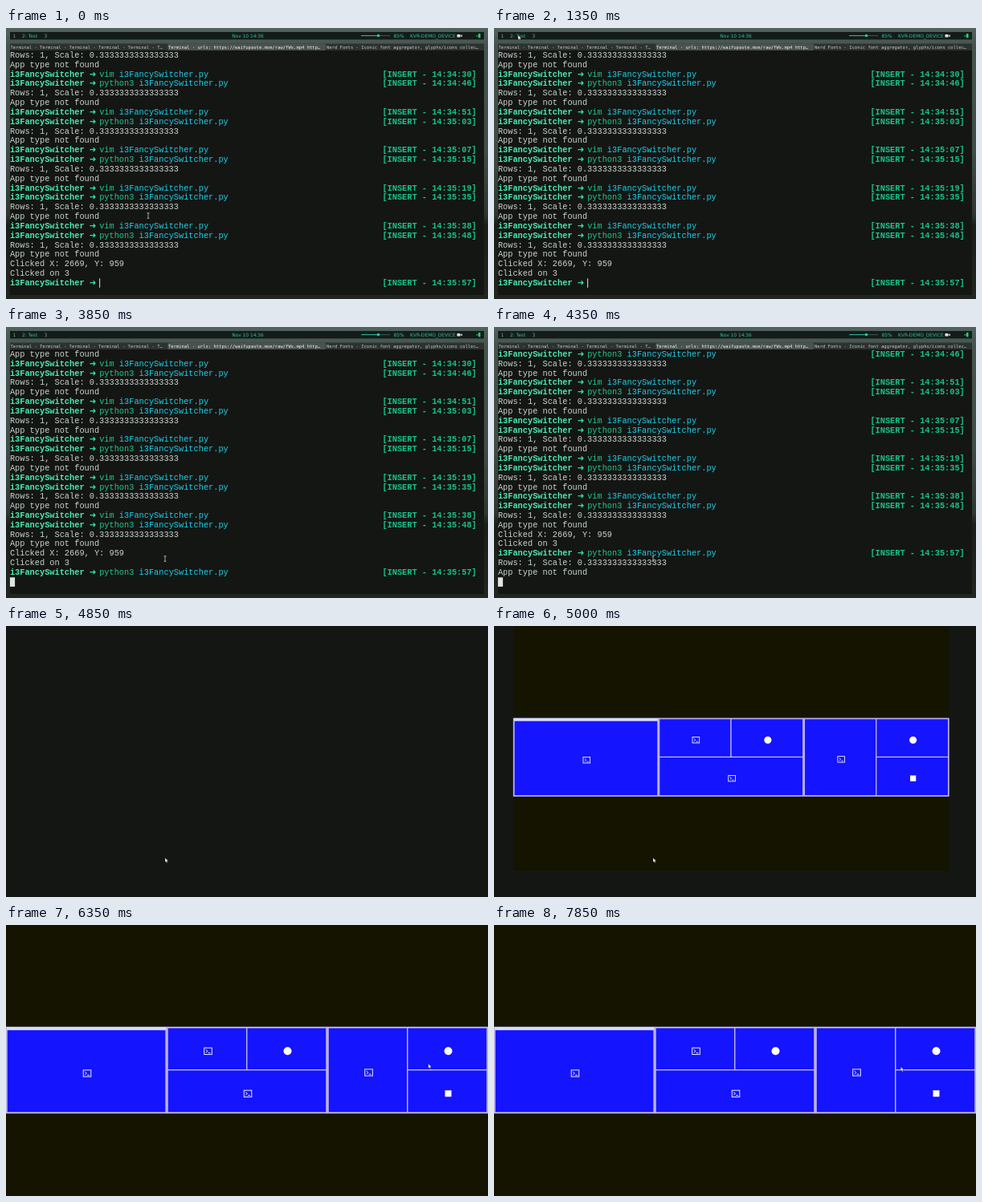
Write an HTML page that moves like this. It is 600 px wide and 338 px high and loops after 8000 ms.

```html
<!DOCTYPE html>
<html lang="en">
<head>
<meta charset="utf-8">
<title>Workspace switcher</title>
<style>
  html, body { margin: 0; width: 100%; height: 100%; overflow: hidden; background: #141614; }
  svg { display: block; width: 100vw; height: 100vh; }
  text { white-space: pre; }
  .term { font: 10.3px "Liberation Mono", monospace; fill: #c9d3ce; }
  .term .prompt { font-weight: bold; fill: #4cecb0; }
  .term .arrow { font-family: "DejaVu Sans", sans-serif; fill: #35e0a0; }
  .term .cmd { fill: #20c78c; }
  .term .file { fill: #1cd0e6; }
  .term .time { font-weight: bold; fill: #18c48a; }
  .term .hint { fill: #868a88; }
  .bar { font: 5.9px "DejaVu Sans", sans-serif; fill: #2fc2a0; }
  .bar .dim { fill: #7fa297; }
  .tabs { font: 5.53px "DejaVu Sans Mono", monospace; fill: #c3c8c6; }
  .cell { fill: #1414ff; stroke: #c9c2f4; stroke-width: 1.2; }
  .space { fill: none; stroke: #bcb0ee; stroke-width: 1.8; }
</style>
</head>
<body>
<svg viewBox="0 0 600 338" preserveAspectRatio="none">
  <defs>
    <linearGradient id="mist" x2="0" y2="1">
      <stop offset="0" stop-color="#52635d"/>
      <stop offset=".07" stop-color="#45534e"/>
      <stop offset=".45" stop-color="#3f4c47"/>
      <stop offset=".69" stop-color="#2e3632"/>
      <stop offset=".73" stop-color="#1b1d19"/>
      <stop offset="1" stop-color="#23251f"/>
    </linearGradient>
    <clipPath id="view"><rect x="0" y="28" width="600" height="305"/></clipPath>
    <g id="shell" fill="none" stroke="#fff" stroke-width=".9">
      <rect x="-4.8" y="-4.1" width="9.6" height="8.2"/>
      <path d="M-2.8-2L-.6 0-2.8 2M.2 2.2H2.8"/>
    </g>
  </defs>

  <g id="desk">
    <rect width="600" height="338" fill="url(#mist)"/>
    <g class="bar">
      <rect x="5" y="5" width="590" height="9.4" fill="#141c1a"/>
      <text class="dim" x="8.5" y="11.8">1</text>
      <text x="20" y="11.8">2: Test</text>
      <text class="dim" x="47.5" y="11.8">3</text>
      <text x="301" y="11.8" text-anchor="middle">Nov 10 14:36</text>
      <path d="M442 9.6H463" stroke="#2fc2a0"/>
      <path d="M463 9.6H478" stroke="#3d5a52"/>
      <circle cx="463.5" cy="9.6" r="1.8"/>
      <text x="482.5" y="11.8">85%</text>
      <text x="503" y="11.8">KVR-DEMO_DEVICE</text>
      <path d="M561.5 8h4v3.6h-4zM566 9.4l1.8-1.1v3L566 10.2z" fill="#dfe5e2"/>
      <path d="M588 7h2.5v5.2H588zM585.5 9.2h2v1.4h-2z" fill="#2fd06a"/>
    </g>
    <g class="tabs">
      <rect x="5" y="19.5" width="590" height="8.5" fill="#2c3230"/>
      <rect x="201.5" y="19.5" width="196.5" height="8.5" fill="#4a524f"/>
      <text x="5.5" y="25.5">Terminal - Terminal - Terminal - Terminal - Terminal - T…</text>
      <text x="202" y="25.5" fill="#f2f4f3">Terminal - urls: https://waifupaste.moe/raw/fWs.mp4 http…</text>
      <text x="399" y="25.5">Nerd Fonts - Iconic font aggregator, glyphs/icons collec…</text>
    </g>
    <rect x="5" y="28" width="590" height="305" fill="#141614"/>
    <g clip-path="url(#view)">
      <g class="term" id="log"></g>
    </g>
    <rect id="caret" fill="#dfe5e2"/>
  </g>

  <rect id="shade" width="600" height="338" fill="#141614"/>
  <g id="grid">
    <rect width="600" height="338" fill="#141400"/>
    <g id="cells"></g>
  </g>

  <path id="beam" d="M-1.5-3.2H1.5M0-3.2V3.2M-1.5 3.2H1.5" fill="none" stroke="#c4c9c6" stroke-width=".8"/>
  <path id="arrow" d="M0 0V5.7L1.3 4.6 2.2 6.5 3.1 6.1 2.3 4.3H4Z" fill="#fff" stroke="#111" stroke-width=".4"/>
</svg>

<script>
const LOOP = 8000, TICK = 50;
const LEFT = 4.9, TOP = 28.2, COL = 6.18, ROW = 11.83;
const $ = id => document.getElementById(id);

function add(parent, tag, attrs, text) {
  const el = document.createElementNS("http://www.w3.org/2000/svg", tag);
  for (const k in attrs) el.setAttribute(k, attrs[k]);
  if (text) el.textContent = text;
  return parent.appendChild(el);
}
const show = (el, on) => el.style.display = on ? "" : "none";

// Terminal log
const log = $("log");
const put = (row, col, text, cls = "") =>
  add(log, "text", { x: LEFT + col * COL, y: TOP + row * ROW + 8.7, class: cls }, text);

let row = 0;
const script = "i3FancySwitcher.py";
const line = text => put(row++, 0, text);
function prompt(time) {
  put(row, 0, "i3FancySwitcher", "prompt");
  put(row, 16, "➜", "arrow");
  put(row++, 75, `[INSERT - ${time}]`, "time");
}
function command(cmd, time) {
  put(row, 18, cmd, "cmd");
  put(row, 19 + cmd.length, script, "file");
  prompt(time);
}
function output() {
  return [line("Rows: 1, Scale: 0.3333333333333333"), line("App type not found")];
}

const runs = ["14:34:30 14:34:46", "14:34:51 14:35:03", "14:35:07 14:35:15",
              "14:35:19 14:35:35", "14:35:38 14:35:48"];
for (const run of runs) {
  const [edit, start] = run.split(" ");
  output();
  command("vim", edit);
  command("python3", start);
}
output();
line("Clicked X: 2669, Y: 959");
line("Clicked on 3");
const last = row;
prompt("14:35:57");
const letter = put(last, 18, "p", "prompt");
const hint = put(last, 19, "ython3 " + script, "hint");
const typed = [put(last, 18, "python3", "cmd"), put(last, 26, script, "file")];
const [rowsOut, appOut] = output();

// Workspace overview
const cells = $("cells");
const box = (x, y, width, height, cls) => add(cells, "rect", { x, y, width, height, class: cls });
const shell = (x, y) => add(cells, "use", { href: "#shell", x, y });
box(.8, 127.8, 198.7, 106.4, "cell");
box(200.8, 127.8, 99, 53, "cell");
box(299.8, 127.8, 99.4, 53, "cell");
box(200.8, 180.8, 198.4, 53.4, "cell");
box(400.8, 127.8, 99, 106.4, "cell");
box(499.8, 127.8, 99.4, 53, "cell");
box(499.8, 180.8, 99.4, 53.4, "cell");
for (const x of [0, 200, 400]) box(x + .7, 127.7, 198.6, 106.6, "space");
add(cells, "rect", { x: 1, y: 127.5, width: 198, height: 3.7, fill: "#dcdcfa" });
shell(101, 185);
shell(251.5, 157.3);
shell(301, 210.3);
shell(451.5, 184);
for (const x of [350.5, 550.5]) add(cells, "circle", { cx: x, cy: 157.3, r: 5, fill: "#fff" });
add(cells, "rect", { x: 546.5, y: 206.2, width: 8, height: 8, fill: "#fff" });

// Pointer track: time, x, y
const track = [
  [0, 177, 234], [100, 229, 150], [250, 39, 25], [400, 39, 25], [600, 10, 12],
  [700, 10, 12], [900, 26, 7], [1150, 49, 8], [1350, 30, 9], [1450, 50, 30],
  [1550, 63, 92], [1700, 63, 92], [1800, 175, 242], [1950, 175, 242],
  [2150, 198, 289], [5150, 198, 289], [5650, 369, 206], [5750, 369, 206],
  [5950, 468, 194], [6150, 468, 194], [6250, 492, 225], [6350, 525.7, 173],
  [6600, 525.7, 173], [6850, 352, 210], [7200, 352, 210], [7400, 400, 227],
  [7650, 513, 200], [7850, 506.3, 176.7], [LOOP, 506.3, 176.7]
];
function pointer(t) {
  const i = track.findIndex(p => p[0] > t);
  const [t0, x0, y0] = track[i - 1], [t1, x1, y1] = track[i];
  const k = (t - t0) / (t1 - t0);
  return [x0 + (x1 - x0) * k, y0 + (y1 - y0) * k];
}

// Caret blink toggles until the command is entered
const toggles = [150, 800, 1400, 2050, 2650, 2700, 3350, 3400];
const caret = $("caret");
function drawCaret(t, lines) {
  const block = t >= 3800;
  const col = block ? 0 : t < 2700 ? 18 : t < 3450 ? 19 : 44;
  const on = block || toggles.filter(x => x <= t).length % 2 === 0;
  show(caret, on);
  caret.setAttribute("x", LEFT + col * COL);
  caret.setAttribute("y", TOP + Math.min(last, last + lines) * ROW + .2);
  caret.setAttribute("width", block ? 6.2 : 1);
  caret.setAttribute("height", 11.5);
}

function draw(t) {
  const lines = [3800, 4250, 4350].filter(x => x <= t).length;
  log.setAttribute("transform", `translate(0 ${-lines * ROW})`);
  show(letter, t >= 2700 && t < 3450);
  show(hint, t >= 2750 && t < 3450);
  typed.forEach(el => show(el, t >= 3450));
  show(rowsOut, t >= 4250);
  show(appOut, t >= 4350);
  drawCaret(t, lines);

  $("shade").setAttribute("opacity", Math.max(0, Math.min(1, (t - 4700) / 150)));
  show($("desk"), t < 4850);
  show($("grid"), t >= 5000);
  $("grid").setAttribute("transform", t < 5200 ? "translate(24 0) scale(.904)" : "");

  const [x, y] = pointer(t), overText = t < 4750 && y > 28;
  show($("beam"), overText);
  show($("arrow"), !overText);
  $(overText ? "beam" : "arrow").setAttribute("transform", `translate(${x} ${y})`);
}

function frame() {
  draw(Math.floor(performance.now() % LOOP / TICK) * TICK);
  requestAnimationFrame(frame);
}
frame();
</script>
</body>
</html>
```
